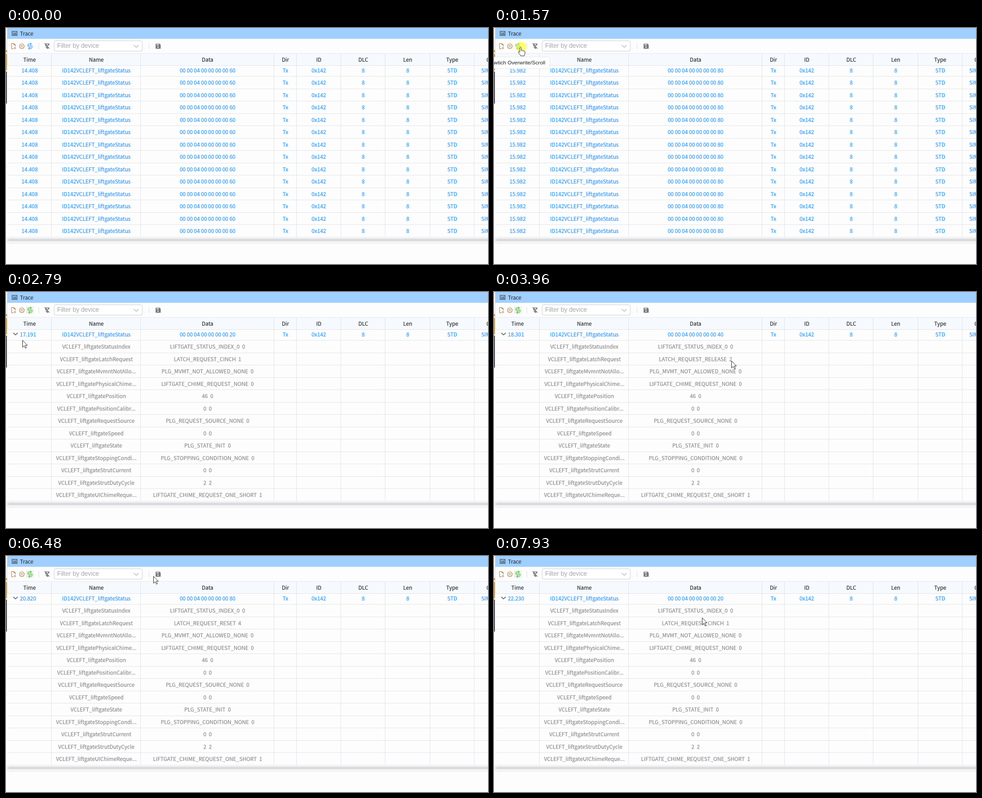
Recreate the animation shown at these times as an HTML page. Size 1066 by 525 pixels, loop 8000 ms.

```html
<!DOCTYPE html>
<html lang="en">
<head>
<meta charset="utf-8">
<title>Trace</title>
<style>
html, body { margin: 0; width: 100%; height: 100%; overflow: hidden; background: #fdfdfd; }
#stage { position: relative; width: 1066px; height: 525px; overflow: hidden; background: #fdfdfd;
  font: 11.81px/26.1px "Noto Sans CJK SC", "Noto Sans CJK JP", "Noto Sans CJK", sans-serif; color: #1c1f23; }
#stage > * { position: absolute; }
#window { left: 2px; top: -8px; width: 1080px; height: 485px; border: 1px solid #d9dce2;
  border-radius: 0 0 0 4px; background: #fdfdfd; }
#title { left: 3px; top: 0; width: 1063px; height: 24px; background: #a0cfff; }
#caption { left: 31px; top: 0; line-height: 23px; }
.ui { font-family: "Liberation Sans", Arial, sans-serif; white-space: pre; }
#select { left: 106px; top: 28px; width: 188px; height: 22px; padding-left: 6px; border: 1px solid #c9ccd3;
  border-radius: 4px; background: #fff; color: #a3a6ad; font-size: 13.8px; line-height: 22px; }
.row { display: grid; grid-template-columns: 98.4px 196.8px 295.2px 49.2px repeat(5, 98.4px);
  position: absolute; left: 3px; height: 27.53px; text-align: center; white-space: pre; }
.row div { box-sizing: border-box; padding-left: 1px; border: solid #e0e3e8; border-width: 0 1px 1px 0; overflow: hidden; }
#head { top: 56px; background: #f6faff; border-top: 1px solid #e4e7ec; height: 27px; }
#body { left: 0; top: 83.5px; width: 1066px; height: 382.5px; overflow: hidden; }
.view { position: absolute; inset: 0; background: #fdfdfd; }
.row { -webkit-text-stroke: .12px; }
.msg { color: #1e90ff; }
.signal { color: #828282; }
#tree .msg div:first-child { padding-right: 7px; }
#bar { left: 4px; top: 467.5px; width: 1080px; height: 7px; border-radius: 4px; background: #dcdde0; }
#tip { left: -19px; top: 64px; width: 141px; height: 25px; border: 1px solid #e4e7ed;
  border-radius: 4px; background: #fff; line-height: 25px; text-indent: 10px; }
svg { overflow: visible; }
#icons { left: 0; top: 0; fill: none; stroke-width: 1.1; }

/* timed parts, one 8 s loop */
#list, #tree, #leaves, .shut, .open, .off, .on, #cursor, .arrow, .hand, .resize, #spot, #tip {
  animation: 8s linear infinite; }
#list, .off { animation-name: until-switch; }
#tree, .on { animation-name: from-switch; }
#leaves, .open { animation-name: from-expand; }
.shut { animation-name: until-expand; }
#cursor { animation-name: move; left: 0; top: 0; }
.arrow { animation-name: arrow; }
.hand { animation-name: hand; }
.resize { animation-name: resize; }
#spot { animation-name: click; }
#tip { animation-name: tip; }
@keyframes until-switch { 0%, 20.4% { visibility: visible } 20.41%, 100% { visibility: hidden } }
@keyframes from-switch { 0%, 20.4% { visibility: hidden } 20.41%, 100% { visibility: visible } }
@keyframes until-expand { 0%, 20.4% { visibility: hidden } 20.41%, 33% { visibility: visible } 33.01%, 100% { visibility: hidden } }
@keyframes from-expand { 0%, 33% { visibility: hidden } 33.01%, 100% { visibility: visible } }
@keyframes move {
  0%, .8% { transform: translate(968px, 498px); animation-timing-function: ease-in-out }
  9.8% { transform: translate(60px, 34px) }
  12%, 20.5% { transform: translate(58px, 43px); animation-timing-function: ease-in-out }
  29%, 33% { transform: translate(21px, 98px) }
  34.8% { transform: translate(36px, 107px); animation-timing-function: ease-in }
  41.5% { transform: translate(290px, 128px) }
  45.5% { transform: translate(549px, 150px) }
  49%, 53% { transform: translate(525px, 153px) }
  62.8% { transform: translate(520px, 145px); animation-timing-function: ease-in-out }
  66.2%, 66.5% { transform: translate(96px, 61px) }
  68%, 75% { transform: translate(57px, 42px); animation-timing-function: ease-in-out }
  80.9% { transform: translate(324px, 44px) }
  83.5% { transform: translate(365px, 59px); animation-timing-function: ease-out }
  93%, 100% { transform: translate(460px, 137px) }
}
@keyframes arrow {
  0%, .8% { opacity: 0 } .81%, 9.8% { opacity: 1 } 9.81%, 22% { opacity: 0 }
  22.01%, 65.8% { opacity: 1 } 65.81%, 76.5% { opacity: 0 } 76.51%, 100% { opacity: 1 }
}
@keyframes hand {
  0%, 9.8% { opacity: 0 } 9.81%, 22% { opacity: 1 } 22.01%, 67.3% { opacity: 0 }
  67.31%, 76.5% { opacity: 1 } 76.51%, 100% { opacity: 0 }
}
@keyframes resize { 0%, 65.8% { opacity: 0 } 65.81%, 67.3% { opacity: 1 } 67.31%, 100% { opacity: 0 } }
@keyframes click {
  0%, 18.6% { opacity: 0 } 18.61%, 21% { opacity: 1 } 21.01%, 31.5% { opacity: 0 }
  31.51%, 33.5% { opacity: 1 } 33.51%, 100% { opacity: 0 }
}
@keyframes tip {
  0%, 11.7% { opacity: 0 } 13.5%, 22% { opacity: 1 } 25%, 68.3% { opacity: 0 }
  70.5%, 75.5% { opacity: 1 } 78.5%, 100% { opacity: 0 }
}
</style>
</head>
<body>
<div id="stage">
  <div id="window"></div>
  <div id="title"></div>
  <div id="caption">Trace</div>
  <div id="select" class="ui">Filter by device</div>
  <div id="body">
    <div id="list" class="view"></div>
    <div id="tree" class="view"><div id="leaves"></div></div>
  </div>
  <div id="head" class="row"></div>
  <div id="bar"></div>
  <svg id="icons" width="1066" height="525">
    <g stroke="none">
      <path d="M0 49h2v5h-2zM0 58h2v36h-2z" fill="#c79a5b"/>
      <path d="M0 97h2v71h-2z" fill="#4a4a50"/>
      <path d="M0 308h2v1h-2z" fill="#d5d8de"/>
    </g>
    <g stroke="#33383f">
      <rect x="13.5" y="7.5" width="11" height="9"/>
      <path d="M15.5 10.5h2.5M19.5 10.5h3.5M15.5 12.5h7.5M15.5 14.5h7.5"/>
    </g>
    <path d="M72.5 33v14M316.5 33v14" stroke="#dcdfe6"/>
    <g stroke="#a67b3d">
      <path d="M17 46.5h-4.5v-12h5l3 3v3.5M17.5 34.5v3h3M18 42.5l3.5 4M21.5 42.5l-3.5 4"/>
      <circle cx="35" cy="40.5" r="5.3"/>
      <path d="M33.5 38v5M36.5 38v5"/>
    </g>
    <g id="cycle">
      <path d="M48 41.5a5.2 5.2 0 0 1 7.5-6M58 39.500a5.200 5.200 0 0 1-7.500 6M54 33.500l2 2-2 2M52 43.500l-2 2 2 2"/>
      <rect x="50.5" y="38.5" width="5" height="4" rx="1"/>
    </g>
    <path d="M87 35.5h8.500l-3.500 4.500v5.500l-3-2v-3.500l-2-2.500M85.500 34l10.500 12" stroke="#303338"/>
    <path d="M282.500 38l5.500 5 5.500-5" stroke="#a8abb2"/>
    <path d="M331.500 35.500h8l2 2v8h-10z" fill="#73767a" stroke="#73767a"/>
    <path d="M333 37.500h5M334.500 42.500h3.500" stroke="#fdfdfd" stroke-width="2"/>
    <g stroke="#303338" stroke-width="1.300">
      <path class="shut" d="M18.500 89l4.500 4.500-4.500 4.500"/>
      <path class="open" d="M16 91l5 4.500 5-4.500"/>
    </g>
  </svg>
  <div id="tip" class="ui">Swtich Overwrite/Scroll</div>
  <svg id="cursor" width="1" height="1" stroke="#222" stroke-linejoin="round">
    <circle id="spot" cx="1.500" cy="-.5" r="11.500" fill="#ff0" fill-opacity=".6" stroke="none"/>
    <path class="arrow" fill="#fff" d="M.5 .5v15.500l3.700-3.500 2.500 5.500 2.400-1-2.400-5.500h4.500z"/>
    <path class="hand" fill="#fff" d="M-1 1.500C-1-.5 2.200-.5 2.200 1.500V7.200C3.400 6.200 5 6.600 5.200 7.800C6.400 7 7.800 7.500 8 8.600C9.400 8 10.500 8.800 10.500 10.200V14C10.500 16 9 17 9 19H1C.5 16.500-3 14-4 11.200C-4.500 9.500-2.500 8.800-1 11z"/>
    <path class="resize" fill="#111" stroke="#fff" paint-order="stroke" d="M-2.500-9h2v18h-2zM1-9h2v18h-2zM-3.500-1h-3v-3l-4.500 4 4.500 4v-3h3zM4-1h3v-3l4.500 4-4.500 4v-3h-3z"/>
  </svg>
</div>
<script>
const LOOP = 8000, PITCH = 27.53;
const $ = id => document.getElementById(id);

function addRow(parent, kind, index, cells) {
  const row = document.createElement('div');
  row.className = 'row ' + kind;
  row.style.top = index * PITCH - 3 + 'px';
  fill(row, cells);
  parent.append(row);
  return row;
}
function fill(row, cells) {
  for (let i = 0; i < 9; i++) {
    const cell = document.createElement('div');
    cell.textContent = cells[i] || '';
    row.append(cell);
  }
}

fill($('head'), ['Time', 'Name', 'Data', 'Dir', 'ID', 'DLC', 'Len', 'Type', 'Channel']);

const message = ['', 'ID142VCLEFT_liftgateStatus', '', 'Tx', '0x142', '8', '8', 'STD', 'SIMULATE_0'];
const messages = Array.from({ length: 14 }, (_, i) => addRow($('list'), 'msg', i, message));
messages.push(addRow($('tree'), 'msg', 0, message));

const signals = [
  ['StatusIndex', 'LIFTGATE_STATUS_INDEX_0  0'],
  ['LatchRequest', ''],
  ['MvmntNotAllo...', 'PLG_MVMT_NOT_ALLOWED_NONE  0'],
  ['PhysicalChime...', 'LIFTGATE_CHIME_REQUEST_NONE  0'],
  ['Position', '46  0'],
  ['PositionCalibr...', '0  0'],
  ['RequestSource', 'PLG_REQUEST_SOURCE_NONE  0'],
  ['Speed', '0  0'],
  ['State', 'PLG_STATE_INIT  0'],
  ['StoppingCondi...', 'PLG_STOPPING_CONDITION_NONE  0'],
  ['StrutCurrent', '0  0'],
  ['StrutDutyCycle', '2  2'],
  ['UIChimeReque...', 'LIFTGATE_CHIME_REQUEST_ONE_SHORT  1']
].map(([name, value], i) => addRow($('leaves'), 'signal', i + 1, ['', 'VCLEFT_liftgate' + name, value]));

for (const [kind, color] of [['off', '#1e90ff'], ['on', '#2fb81f']]) {
  const icon = $('cycle').cloneNode(true);
  icon.removeAttribute('id');
  icon.setAttribute('class', kind);
  icon.setAttribute('stroke', color);
  if (kind === 'on') icon.insertAdjacentHTML('afterbegin',
    '<rect x="45.5" y="33" width="15" height="15" fill="#f3f7f2" stroke="#e3ebe1"/>');
  $('icons').append(icon);
}
$('cycle').remove();

// Bus clock: [loop ms, stamp ms]; a message arrives about every 100 ms.
const clock = [[0, 14408], [1560, 15982], [2780, 17191], [3950, 18301],
  [5300, 19704], [6470, 20820], [7920, 22230], [8000, 22310]];
const latchTimes = [640, 1680, 2700, 3760, 4800, 5860, 6890, 7900];
const latchNames = ['NONE', 'CINCH', 'RELEASE', 'FORCE_RELEASE', 'RESET'];

function stampAt(t) {
  const i = clock.findLastIndex(c => c[0] <= t);
  const [t0, s0] = clock[i], [t1, s1] = clock[i + 1];
  const n = Math.round((s1 - s0) / 100);
  return s0 + Math.floor((t - t0) / (t1 - t0) * n) / n * (s1 - s0);
}
function setText(node, text) {
  if (node.textContent !== text) node.textContent = text;
}

let start;
function draw(now) {
  start ??= now;
  const t = (now - start) % LOOP;
  const latch = (3 + latchTimes.filter(x => x <= t).length) % 5;
  const stamp = (stampAt(t) / 1000).toFixed(3);
  const data = '00 00 04 00 00 00 00 ' + (latch * 32).toString(16).padStart(2, '0');
  for (const row of messages) {
    setText(row.children[0], stamp);
    setText(row.children[2], data);
  }
  setText(signals[1].children[2], `LATCH_REQUEST_${latchNames[latch]}  ${latch}`);
  requestAnimationFrame(draw);
}
requestAnimationFrame(draw);
</script>
</body>
</html>
```
